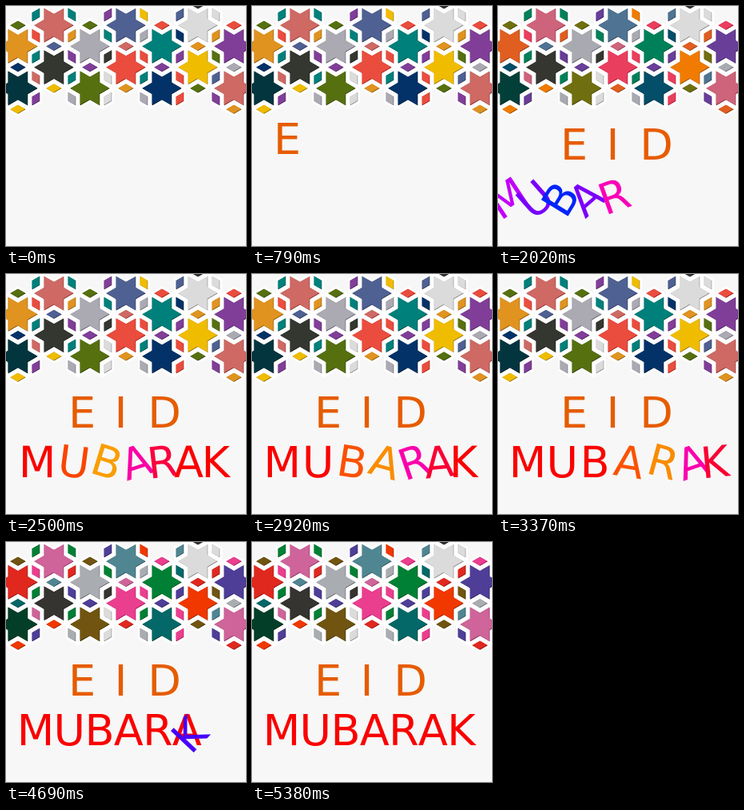
An HTML page with a canvas that plays this animation: 300 px wide and 300 px high, repeating every 5.41 s.

```html
<!DOCTYPE html>
<html lang="en">
<head>
<meta charset="utf-8">
<title>Eid Mubarak</title>
<style>
html, body { margin: 0; width: 100%; height: 100%; overflow: hidden; background: #f7f7f7; }
canvas { display: block; width: 300px; height: 300px; }
</style>
</head>
<body>
<canvas id="stage" width="300" height="300"></canvas>
<script>
const ctx = document.getElementById('stage').getContext('2d');
const LOOP = 5410, STEP = 30, RAD = Math.PI / 180;
const FONT = '54px "DejaVu Sans", sans-serif';
const COL = 45, ROW = 52.5;

// hue, saturation, lightness
const palette = {
  o: [36, 76, 50], s: [3, 52, 60], k: [80, 5, 20], g: [250, 5, 68],
  v: [76, 75, 25], b: [224, 30, 44], r: [5, 80, 58], t: [178, 100, 25],
  n: [212, 95, 21], l: [0, 0, 86], y: [47, 100, 47], p: [284, 42, 42],
  d: [190, 90, 13]
};
// One string per column, top to bottom
const stars = ['od', 'sk', 'gv', 'br', 'tn', 'ly', 'ps'];
const flat = ['vny', ' by', 'vp ', ' so', 'rp ', 'kov', 'rgo'];
const slanted = ['trtsp', 'toptg', 'ptkll', 'ygrtg', 'bnprr', 'lovbp'];

const clamp = v => Math.max(0, Math.min(1, v));
const ramp = (t, from, to) => clamp((t - from) / (to - from));
const smooth = (t, from, to) => {
  const p = ramp(t, from, to);
  return p * p * (3 - 2 * p);
};
const hsl = (h, s, l) => `hsl(${(h + 720) % 360}, ${s}%, ${l}%)`;

function polygon(count, radius) {
  const path = new Path2D();
  for (let i = 0; i < count; i++) {
    const a = i * 2 * Math.PI / count, r = radius(i);
    path.lineTo(r * Math.cos(a), r * Math.sin(a));
  }
  path.closePath();
  return path;
}
const starPath = polygon(12, i => i % 2 ? 25 / Math.sqrt(3) : 25);
const diamondPath = polygon(4, i => i % 2 ? 5.8 : 10);

// A coloured cut-out with a thin shade along its lower right edge
function tile(path, x, y, angle, [h, s, l]) {
  ctx.save();
  ctx.translate(x, y);
  ctx.rotate(angle * RAD);
  ctx.strokeStyle = '#fff';
  ctx.lineWidth = 5;
  ctx.stroke(path);
  ctx.clip(path);
  ctx.fillStyle = hsl(h, s, l * 0.6);
  ctx.fill(path);
  ctx.rotate(-angle * RAD);
  ctx.translate(-0.8, -0.8);
  ctx.rotate(angle * RAD);
  ctx.fillStyle = hsl(h, s, l);
  ctx.fill(path);
  ctx.restore();
}

function grid(columns, place) {
  columns.forEach((keys, c) => [...keys].forEach((key, r) => {
    if (key !== ' ') place(palette[key], c, r);
  }));
}

function drawPattern(t) {
  // The hues drift away and back, then away again
  const drift = smooth(t, 790, 1510) - smooth(t, 1510, 2500) + smooth(t, 3370, 4120);
  const tone = ([h, s, l]) => [h - 33 * drift, s, l];
  const x = c => 15 + c * COL;
  grid(stars, (color, c, r) =>
    tile(starPath, x(c), (c % 2 ? 24.3 : 50.5) + r * ROW, 0, tone(color)));
  grid(flat, (color, c, r) =>
    tile(diamondPath, x(c), (c % 2 ? -2 : 24.3) + r * ROW, 0, tone(color)));
  grid(slanted, (color, c, r) =>
    tile(diamondPath, x(c + 0.5), 11.2 + r * ROW / 2, (c + r) % 2 ? 60 : 120, tone(color)));
}

function letter(ch, x, y, angle, color) {
  ctx.save();
  ctx.translate(x, y);
  ctx.rotate(angle * RAD);
  ctx.fillStyle = color;
  ctx.fillText(ch, 0, 19.7);
  ctx.restore();
}

// The first word slides in from the left, letter by letter
function drawTop(t) {
  [...'EID'].forEach((ch, i) => {
    const start = 570 + i * 315, x = 95 + i * 51.5 - (i === 1 ? 3 : 0);
    if (t < start) return;
    const left = (1 - ramp(t, start, start + 365)) * (x + 25);
    letter(ch, x - left, 172.7 - left * 0.15, 0, hsl(24, 100, 45));
  });
}

// A letter rolling in from the left, q from 0 to 1
function tumble(q) {
  const turn = Math.sin(Math.PI * q);
  return { dx: -45 * (1 - q ** 3), dy: 7 * turn, angle: -52 * turn };
}

// A ripple running along the word: a push with a twist across its crest
function ripple(i, t) {
  const crest = 2.5 + (t - 2500) * 0.0022, u = i - crest;
  return { dx: 4 * crest * Math.exp(-u * u / 4), dy: 0, angle: -45 * u * Math.exp(-u * u) };
}

function drawWord(t) {
  const gather = smooth(t, 3380, 4000);
  let x = 13.7;
  [...'MUBARAK'].forEach((ch, i) => {
    const width = ctx.measureText(ch).width, start = 1720 + i * 60;
    if (t >= start) {
      const arrive = ramp(t, start, start + 400);
      const settle = ramp(t, 1730 + i * 380, 2770 + i * 380);
      const moves = [
        [tumble(arrive), 1],
        [ripple(i, t), arrive * (1 - gather)],
        [tumble(settle), gather]
      ];
      const sum = key => moves.reduce((total, [pose, weight]) => total + pose[key] * weight, 0);
      const angle = sum('angle');
      letter(ch, x + width / 2 + sum('dx'), 234.3 + sum('dy'), angle, hsl(angle * 2.2, 100, 49));
    }
    x += width - 0.7;
  });
}

function draw(now) {
  const t = Math.floor((now % LOOP) / STEP) * STEP;
  ctx.fillStyle = '#f7f7f7';
  ctx.fillRect(0, 0, 300, 300);
  ctx.font = FONT;
  ctx.textAlign = 'center';
  drawPattern(t);
  drawTop(t);
  drawWord(t);
}

const begin = performance.now();
function tick() {
  draw(performance.now() - begin);
  requestAnimationFrame(tick);
}
tick();
</script>
</body>
</html>
```
